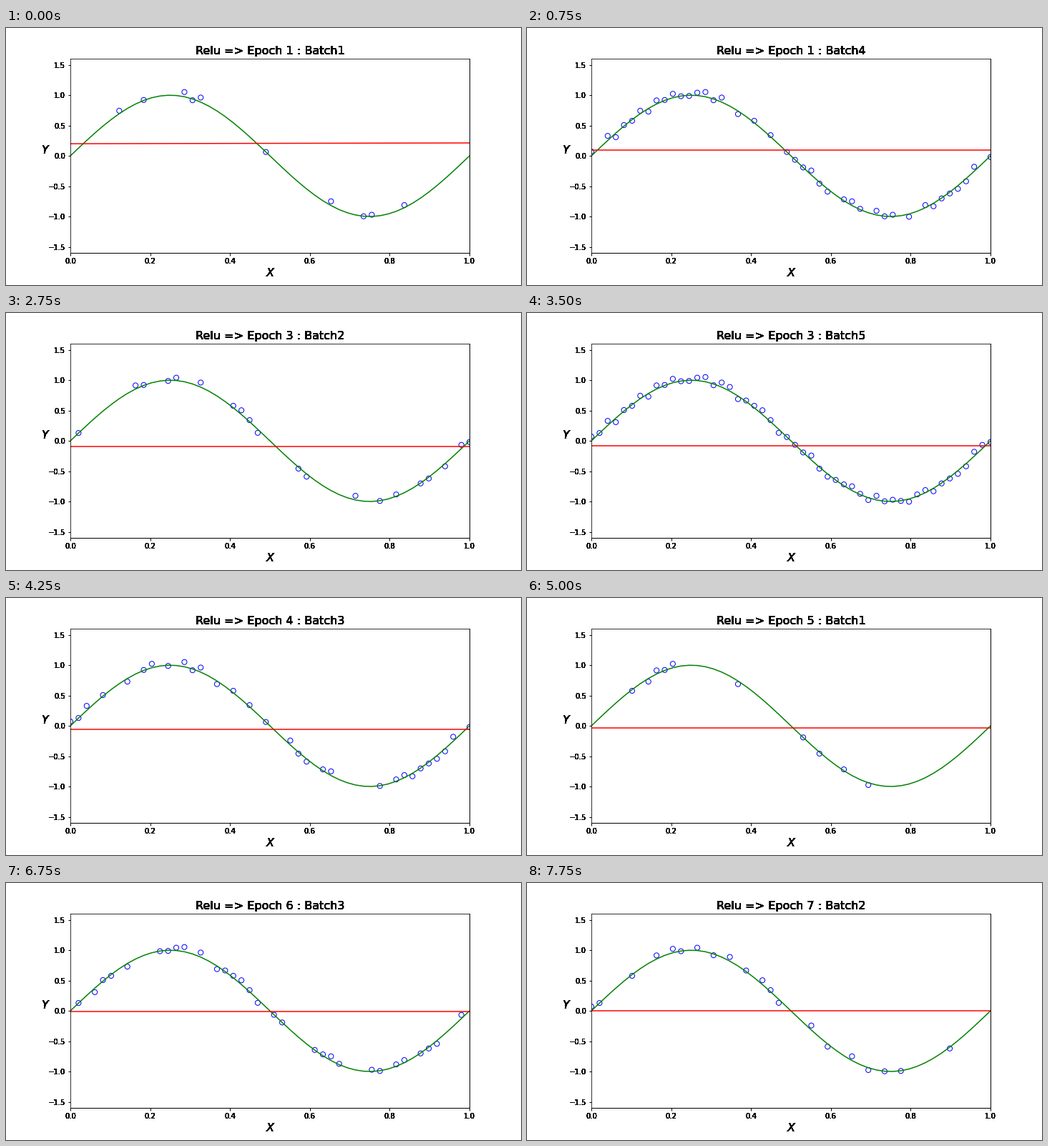
Recreate the animation shown at these times as a matplotlib script. Size 720 by 360 pixels, loop 8 s.

```python
import numpy as np
import matplotlib.pyplot as plt
from matplotlib.animation import FuncAnimation

POINTS, BATCH, FRAMES = 50, 10, 32
BATCHES = POINTS // BATCH

rng = np.random.default_rng(4)
x = np.linspace(0, 1, POINTS)
wave = np.sin(2 * np.pi * x)
y = wave + rng.uniform(-.08, .08, POINTS)

# A fresh shuffle of the samples for every epoch
orders = [rng.permutation(POINTS) for _ in range(FRAMES // BATCHES + 1)]

# Key levels of the prediction: it overshoots zero, then settles
KEY_STEPS = [0, 3, 7, 10, 14, 20, 24, 31]
KEY_LEVELS = [.2, .092, -.055, -.093, -.085, -.04, -.013, -.003]


def prediction(step):
    slope = .013 * max(0, 1 - step / 3)
    return np.interp(step, KEY_STEPS, KEY_LEVELS) + slope * x


def darken(text, passes=12):
    """Paint a text several times so its soft edges turn solid."""
    draw = text.draw

    def draw_all(renderer):
        for _ in range(passes):
            draw(renderer)

    text.draw = draw_all


fig, ax = plt.subplots(figsize=(10, 5), dpi=72, facecolor="white")
fig.subplots_adjust(left=.125, right=.9, bottom=.125, top=.88)
ax.set(xlim=(0, 1), ylim=(-1.6, 1.6),
       xticks=np.linspace(0, 1, 6), yticks=np.linspace(-1.5, 1.5, 7))
ax.tick_params(width=1, labelsize=10)
ax.spines[["left", "top"]].set_linewidth(.8)
ax.spines[["right", "bottom"]].set_linewidth(1)

title = ax.set_title("", fontsize=16)
x_label = ax.set_xlabel("X", fontsize=16, style="italic")
y_label = ax.set_ylabel("Y", fontsize=16, style="italic", rotation=0)
for text in (title, x_label, y_label,
             *ax.get_xticklabels(), *ax.get_yticklabels()):
    darken(text)

dots = ax.scatter([], [], s=50, facecolors="none", edgecolors="blue",
                  linewidths=1)
ax.plot(x, wave, color="green", lw=1.5)
fit, = ax.plot(x, prediction(0), color="red", lw=1.5)


def update(step):
    epoch, batch = divmod(step, BATCHES)
    seen = orders[epoch][:(batch + 1) * BATCH]
    dots.set_offsets(np.column_stack([x[seen], y[seen]]))
    fit.set_ydata(prediction(step))
    title.set_text(f"Relu => Epoch {epoch + 1} : Batch{batch + 1}")
    return dots, fit, title


anim = FuncAnimation(fig, update, frames=FRAMES, interval=250,
                     init_func=lambda: update(0), repeat=True,
                     repeat_delay=0, blit=False)
plt.show()
```
